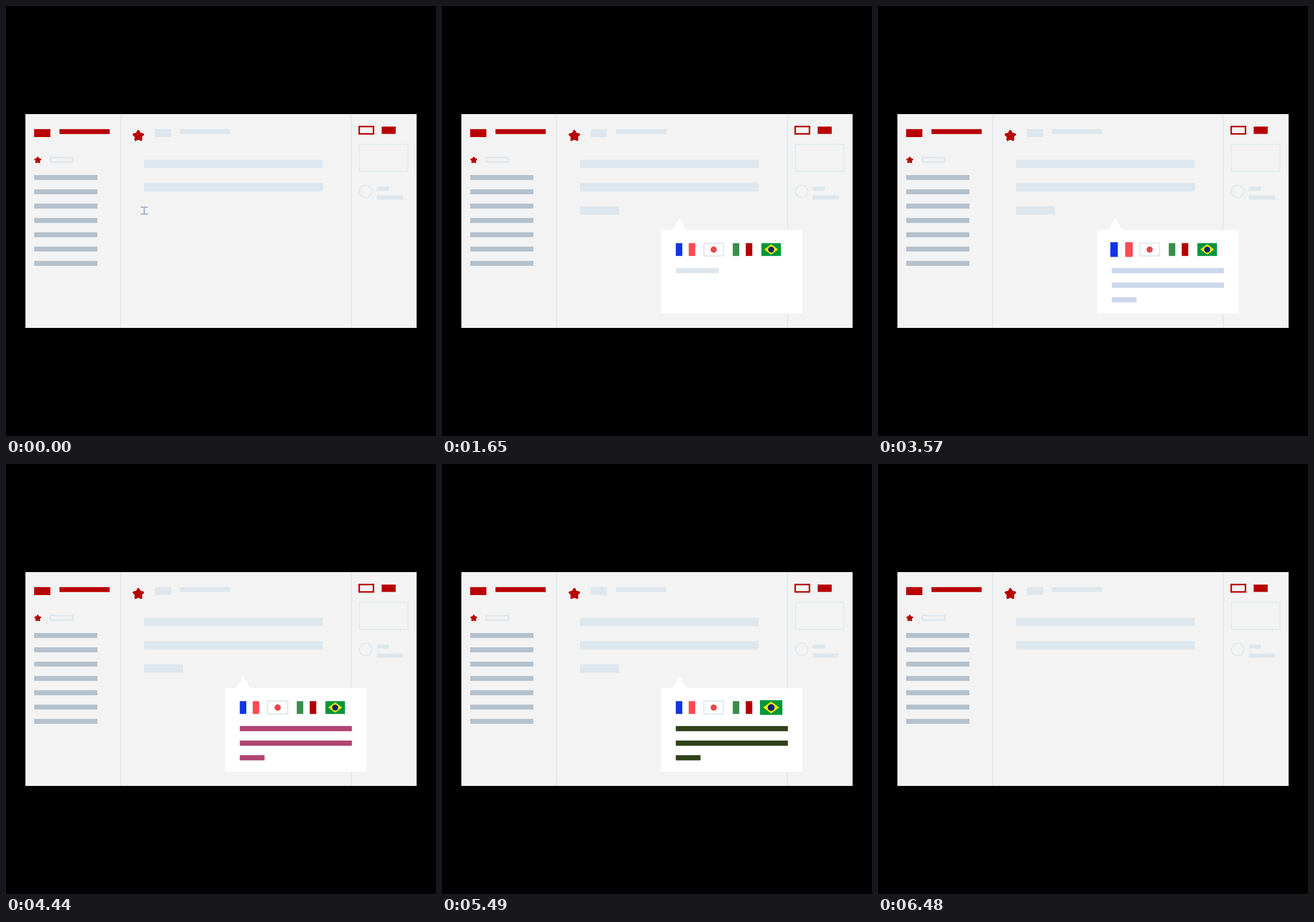
An HTML page for the animation above (6510 ms loop, 748 by 748 pixels).

```html
<!DOCTYPE html>
<html lang="en">
<head>
<meta charset="utf-8">
<title>Translation popup</title>
<style>
html, body { margin: 0; width: 100%; height: 100%; overflow: hidden; background: #000; }
svg { display: block; width: 748px; height: 748px; }
.pale { fill: #dde7ed; }
.red { fill: #b80000; }
.line { fill: none; stroke: #d8e6ec; }
</style>
</head>
<body>
<svg viewBox="0 0 748 748">
  <defs>
    <path id="star" fill="#b80000" stroke="#b80000" stroke-width="4" stroke-linejoin="round"/>
  </defs>
  <rect x="33.7" y="188" width="680.6" height="372" fill="#f3f3f3"/>
  <path class="line" d="M199.4 188V560M600.8 188V560" stroke-width="1.3"/>

  <g class="red">
    <rect x="49" y="214.2" width="28.2" height="13.8"/>
    <rect x="93" y="214.2" width="87.4" height="8.5"/>
    <rect x="653.5" y="209.7" width="24.4" height="12.8"/>
  </g>
  <rect x="614.4" y="209.7" width="24.8" height="12.8" fill="none" stroke="#b80000" stroke-width="2.6"/>
  <use href="#star" transform="translate(55.2 268.2) scale(.6)"/>
  <use href="#star" transform="translate(230.2 226)"/>
  <rect x="77.2" y="263.7" width="38.6" height="7.8" fill="none" stroke="#dde7ed" stroke-width="2.5"/>
  <g id="menu" fill="#b4c1cd"></g>

  <g class="pale">
    <rect x="259" y="214.2" width="28" height="13.8"/>
    <rect x="302.8" y="214.2" width="87.4" height="8.5"/>
    <rect x="240" y="267.5" width="311" height="14.5"/>
    <rect x="240" y="308" width="311" height="14.5"/>
    <rect id="typed" x="240" y="348.5" height="14.5"/>
    <rect x="644.8" y="314" width="21.2" height="7.2"/>
    <rect x="644.8" y="329.5" width="45.6" height="7.3"/>
  </g>
  <g class="line" stroke-width="1.2">
    <rect x="614.8" y="240.5" width="84" height="47.2"/>
    <circle cx="625.6" cy="322.4" r="10.7"/>
  </g>
  <path id="cursor" d="M-6.2 350H6.2M-6.2 361.8H6.2M0 350V361.8" fill="none" stroke="#9db3cb" stroke-width="2.2"/>

  <g id="popup">
    <path d="M413 369L425 389.7H627V535H381.3V389.7H401Z" fill="#fff"/>
    <g class="flag">
      <path d="M406.7 412.5h11.3v22.3h-11.3z" fill="#1034e6"/>
      <path d="M429.2 412.5h11.3v22.3h-11.3z" fill="#ff4a52"/>
    </g>
    <g class="flag">
      <rect x="455.6" y="412.6" width="34" height="22" fill="#fff" stroke="#dde7ed" stroke-width="2"/>
      <circle cx="472.6" cy="423.6" r="5.4" fill="#e5484d"/>
    </g>
    <g class="flag">
      <path d="M505.8 412.5h11.3v22.3h-11.3z" fill="#388e4a"/>
      <path d="M528.4 412.5h11.3v22.3h-11.3z" fill="#b20000"/>
    </g>
    <g class="flag">
      <rect x="555.6" y="412.5" width="34" height="22.3" fill="#009639"/>
      <path d="M560.6 423.6L572.6 414.6L584.6 423.6L572.6 432.6Z" fill="#ffe600"/>
      <circle cx="572.6" cy="423.6" r="5.2" fill="#0a2472"/>
    </g>
    <g id="lines">
      <rect x="406.7" y="455.8" height="9"/>
      <rect x="406.7" y="481.1" height="9"/>
      <rect x="406.7" y="506.5" height="9"/>
    </g>
  </g>
</svg>
<script>
const LOOP = 6510, STEP = 30;
const $ = id => document.getElementById(id);
const set = (el, attrs) => Object.entries(attrs).forEach(([k, v]) => el.setAttribute(k, v));
const ramp = (t, a, b) => Math.min(1, Math.max(0, (t - a) / (b - a)));
const smooth = k => (1 - Math.cos(Math.PI * k)) / 2;
const easeOut = k => 1 - (1 - k) ** 2;

const flags = [...document.querySelectorAll('.flag')];
const lines = [...$('lines').children];
const growth = [[1500, 2200, 195], [2200, 2880, 195], [2895, 3510, 43]];
const inks = [[221, 231, 237], [16, 52, 230], [229, 72, 77], [47, 65, 27], [0, 150, 57]];
const peak = i => 3570 + 650 * i;

const points = Array.from({ length: 10 }, (_, i) => {
  const r = i % 2 ? 4.5 : 8.3, a = Math.PI * (i / 5 - .5);
  return `${r * Math.cos(a)} ${r * Math.sin(a)}`;
});
$('star').setAttribute('d', `M${points.join('L')}Z`);

for (let i = 0; i < 7; i++) {
  const bar = document.createElementNS('http://www.w3.org/2000/svg', 'rect');
  set(bar, { x: 49, y: 294 + 24.9 * i, width: 110, height: 8.6 });
  $('menu').append(bar);
}

function popupScale(t) {
  if (t < 1320) return 1.048 * ramp(t, 900, 1320);
  if (t < 6030) return 1.048 - .048 * ramp(t, 1320, 1650);
  return 1 - smooth(ramp(t, 6030, 6480));
}

function draw(t) {
  const typed = 68 * smooth(ramp(t, 0, 660));
  set($('typed'), { width: typed, opacity: 1 - ramp(t, 6030, 6450) });
  set($('cursor'), { transform: `translate(${240.5 + typed * .985} 0)`, opacity: 1 - ramp(t, 660, 720) });

  const s = popupScale(t);
  set($('popup'), {
    transform: `translate(413 369) scale(${s}) translate(-413 -369)`,
    visibility: s > 0 ? 'visible' : 'hidden'
  });

  let ink = inks[0];
  flags.forEach((flag, i) => {
    const p = peak(i), cx = 423.6 + 49.67 * i;
    const z = 1 + .15 * smooth(1 - ramp(Math.abs(t - p), 0, 300));
    set(flag, { transform: `translate(${cx} 423.6) scale(${z}) translate(${-cx} -423.6)` });
    const k = ramp(t, p - 30, p + 300);
    ink = ink.map((c, j) => c + (inks[i + 1][j] - c) * k);
  });
  set($('lines'), { fill: `rgb(${ink.map(Math.round)})` });
  lines.forEach((line, i) => {
    const [a, b, w] = growth[i];
    set(line, { width: w * easeOut(ramp(t, a, b)) });
  });
}

function tick() {
  const t = performance.now() % LOOP;
  draw(Math.floor(t / STEP) * STEP);
  requestAnimationFrame(tick);
}
tick();
</script>
</body>
</html>
```
